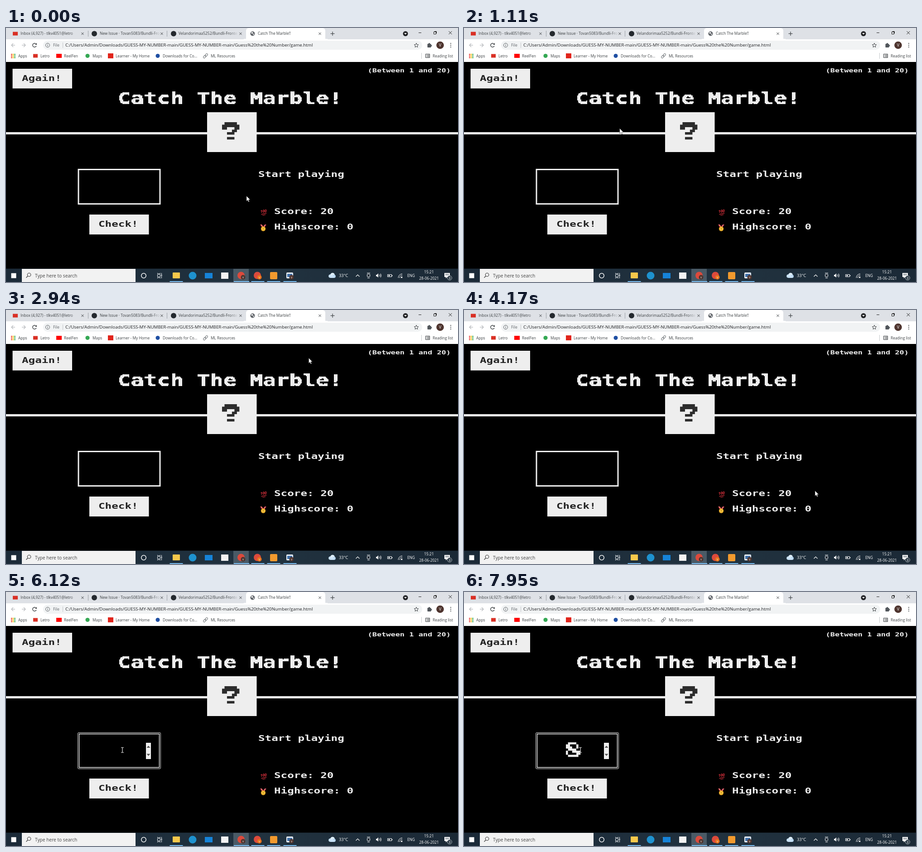
An HTML page with a canvas that plays this animation: 998 by 561 pixels, repeating every 7990 ms.

```html
<!DOCTYPE html>
<html lang="en">
<head>
<meta charset="utf-8">
<title>Catch The Marble!!</title>
<style>
  html, body { margin: 0; width: 100%; height: 100%; overflow: hidden; background: #000; }
  canvas { display: block; }
</style>
</head>
<body>
<canvas id="stage" width="998" height="561"></canvas>
<script>
const W = 998, H = 561, LOOP = 7990;
const INK = '#3c4043', PALE = '#eee', DARK = '#222', TABS = '#dee1e6';
const SANS = '"Open Sans", "Noto Sans", sans-serif';
const MONO = '"DejaVu Sans Mono", "Liberation Mono", monospace';
const WIDE = 1.384; // breadth of the blocky face

const stage = document.getElementById('stage').getContext('2d');
let c;

function makeLayer(w, h) {
  const layer = document.createElement('canvas');
  layer.width = w;
  layer.height = h;
  return layer;
}

function box(x, y, w, h, color, r = 0) {
  c.fillStyle = color;
  c.beginPath();
  c.roundRect(x, y, w, h, r);
  c.fill();
}

function disc(x, y, r, color) {
  c.fillStyle = color;
  c.beginPath();
  c.arc(x, y, r, 0, 7);
  c.fill();
}

function ring(x, y, r, color, width = 1, from = 0, to = Math.PI * 2) {
  c.strokeStyle = color;
  c.lineWidth = width;
  c.beginPath();
  c.arc(x, y, r, from, to);
  c.stroke();
}

function line(color, width, ...pts) {
  c.strokeStyle = color;
  c.lineWidth = width;
  c.beginPath();
  for (let i = 0; i < pts.length; i += 2) c.lineTo(pts[i], pts[i + 1]);
  c.stroke();
}

function poly(color, ...pts) {
  c.fillStyle = color;
  c.beginPath();
  for (let i = 0; i < pts.length; i += 2) c.lineTo(pts[i], pts[i + 1]);
  c.closePath();
  c.fill();
}

function frame(x, y, w, h, color, width = 1, r = 0) {
  c.strokeStyle = color;
  c.lineWidth = width;
  c.beginPath();
  c.roundRect(x, y, w, h, r);
  c.stroke();
}

function label(text, x, y, size = 8.4, color = INK, align = 'left') {
  c.font = `${size}px ${SANS}`;
  c.textAlign = align;
  c.fillStyle = color;
  c.fillText(text, x, y);
}

function wideText(ctx, text, x, y, size, color) {
  ctx.save();
  ctx.translate(x, y);
  ctx.scale(WIDE, 1);
  ctx.font = `bold ${size * 1.2}px ${MONO}`;
  ctx.textAlign = 'left';
  ctx.fillStyle = color;
  ctx.fillText(text, 0, 0);
  ctx.restore();
}

// Text set on a coarse grid, then enlarged with hard edges.
function blockText(text, x, y, size, color) {
  const layer = makeLayer(text.length * 16 + 16, 24);
  const ctx = layer.getContext('2d');
  wideText(ctx, text, 0, 18, 16, color);
  const img = ctx.getImageData(0, 0, layer.width, layer.height);
  for (let i = 3; i < img.data.length; i += 4) img.data[i] = img.data[i] > 75 ? 255 : 0;
  ctx.putImageData(img, 0, 0);
  const k = size / 16;
  c.imageSmoothingEnabled = false;
  c.drawImage(layer, x - k, y - 18 * k, layer.width * k, layer.height * k);
}

// Big signs built from bars: x, y, width, height in units.
const QUERY = [[1, 0, 5, 1], [0, 1, 7, 1], [0, 2, 2, 1], [5, 2, 2, 1], [4, 3, 2, 1], [2, 4, 3, 1], [2, 6, 3, 1]];
const EIGHT = [[1, 0, 4, 1], [0, 1, 2, 2], [2, 2, 1, 1], [5, 1, 1, 2], [1, 3, 4, 1],
  [0, 4, 1, 2], [3, 4, 4, 1], [5, 5, 2, 1], [1, 6, 5, 1]];

function sign(bars, x, y, unit, color) {
  c.fillStyle = color;
  c.beginPath();
  for (const [bx, by, w, h] of bars) c.rect(x + bx * unit, y + by * unit, w * unit, h * unit);
  c.fill();
}

function cross(x, y, s = 2.6, color = INK) {
  line(color, 1, x - s, y - s, x + s, y + s);
  line(color, 1, x + s, y - s, x - s, y + s);
}

function tab(title, x, right) {
  c.save();
  c.beginPath();
  c.rect(x, 0, right - x, 24);
  c.clip();
  label(title, x, 15.3);
  const fade = c.createLinearGradient(right - 18, 0, right, 0);
  fade.addColorStop(0, '#dee1e600');
  fade.addColorStop(1, TABS);
  box(right - 18, 0, 18, 24, fade);
  c.restore();
}

function drawTabs() {
  box(0, 0, W, 25, TABS);
  box(530, 0, 175, 30, '#fff', 6);
  box(525, 24, 185, 3, '#fff');
  box(15, 8.5, 11, 8, '#d93025');
  tab('Inbox (4,927) - tlkv4051@letro', 32, 160);
  disc(195, 12.5, 6, '#24292e');
  tab('New Issue · Tovan5083/Bundli-Frontend', 207, 341);
  disc(370, 12.5, 6, '#24292e');
  tab('Velandorimaa5252/Bundli-Frontend', 381, 512);
  disc(544.5, 12.5, 5, '#5f6368');
  poly('#fff', 541, 10, 544, 9, 546, 11, 543, 13);
  poly('#fff', 545, 14, 548, 12, 547, 16);
  label('Catch The Marble!!', 556, 15.3);
  for (const x of [169, 344, 518, 693]) cross(x, 12.5);
  for (const x of [181, 355]) box(x, 6, 1, 13, '#9aa0a6');
  line(INK, 1.2, 716.5, 12.5, 725.5, 12.5);
  line(INK, 1.2, 721, 8, 721, 17);
  disc(882, 12.5, 5.5, '#202124');
  poly('#fff', 879, 11, 885, 11, 882, 14.5);
  box(911, 10, 6, 1, '#222');
  frame(944.5, 8.5, 5, 5, '#222');
  line('#222', 1, 946, 7.5, 950.5, 7.5, 950.5, 12);
  cross(981, 10.5, 3.5, '#222');
}

function arrow(x, dir, color) {
  line(color, 1.2, x - 4, 38, x + 4, 38);
  line(color, 1.2, x, 34, x + 4 * dir, 38, x, 42);
}

function star(x, y, r) {
  const pts = [];
  for (let i = 0; i <= 10; i++) {
    const a = i * Math.PI / 5 - Math.PI / 2, q = i % 2 ? r * 0.45 : r;
    pts.push(x + q * Math.cos(a), y + q * Math.sin(a));
  }
  line(INK, 1, ...pts);
}

function drawToolbar() {
  box(0, 25, W, 50, '#fff');
  box(82, 28, 837, 20, '#f1f3f4', 10);
  arrow(16, -1, '#b4b7ba');
  arrow(39, 1, '#b4b7ba');
  ring(63, 38, 4.2, INK, 1.4, 0.4, 5.4);
  poly(INK, 64, 37, 68, 37, 68, 33);
  ring(92, 38, 4.5, '#5f6368');
  box(91.5, 37.3, 1, 3.2, '#5f6368');
  box(91.5, 35.2, 1, 1.2, '#5f6368');
  label('File', 104, 41.4, 8.8, '#5f6368');
  box(125, 32, 1, 12, '#c4c7ca');
  label('C:/Users/Admin/Downloads/GUESS-MY-NUMBER-main/GUESS-MY-NUMBER-main/Guess%20the%20Number/game.html',
    131, 41.4, 9.8, '#202124');
  star(906, 38.4, 5);
  box(930.5, 35, 8, 8, '#50555a', 1);
  disc(934.5, 34.8, 1.7, '#50555a');
  disc(938.8, 39, 1.7, '#50555a');
  disc(958.5, 38, 8.3, '#4e342e');
  label('V', 958.5, 41.2, 8.6, '#fff', 'center');
  for (const y of [34, 38, 42]) disc(982, y, 1.1, INK);

  const dots = ['#ea4335', '#fbbc04', '#34a853', '#4285f4'];
  for (let i = 0; i < 9; i++) {
    const row = Math.floor(i / 3);
    box(11 + i % 3 * 3.6, 57 + row * 3.6, 2.5, 2.5, dots[(i + row) % 4]);
  }
  box(60, 57.5, 10, 8, '#d93025');
  box(111, 57, 12, 9, '#f00');
  disc(180, 61.5, 4.6, '#34a853');
  box(225, 56, 12, 11, '#e1251b');
  disc(335, 61.5, 4.5, '#1f4fa3');
  c.save();
  c.translate(440.5, 61.5);
  c.rotate(-0.8);
  frame(-6, -2, 6.5, 4, '#6d7276', 1.1, 2);
  frame(-0.5, -2, 6.5, 4, '#6d7276', 1.1, 2);
  c.restore();
  const marks = [['Apps', 27], ['Letro', 76], ['ReelFen', 128], ['Maps', 191],
    ['Learner - My Home', 242], ['Downloads for Co...', 346], ['ML Resources', 452], ['Reading list', 942]];
  for (const [text, x] of marks) label(text, x, 64.6);
  box(917, 55, 1, 13, '#c4c7ca');
  frame(926.5, 57.5, 9, 8, INK);
  for (const y of [59.5, 61.5, 63.5]) {
    box(928, y - 0.4, 1, 1, INK);
    box(930, y - 0.4, 4.5, 1, INK);
  }
}

function drawHundred() {
  c.save();
  c.translate(568.5, 404);
  c.rotate(-0.13);
  c.font = `italic bold 8.5px ${SANS}`;
  c.textAlign = 'center';
  c.fillStyle = '#d32f3a';
  c.fillText('100', 0, 3.5);
  line('#d32f3a', 1.3, -6, 7, 6, 5.8);
  line('#d32f3a', 1.1, -3.5, 9.6, 3.5, 8.8);
  c.restore();
}

function drawMedal() {
  poly('#d93a3a', 561, 434, 565, 434, 570, 441, 566, 442);
  poly('#c22e3b', 575, 434, 571, 434, 566, 441, 570, 442);
  line('#e9e4ee', 0.8, 563, 434, 568, 441, 573, 434);
  disc(568, 443.5, 5.2, '#e0a021');
  disc(568, 443.5, 3.6, '#f6c945');
  disc(568, 443.5, 1.4, '#d18e18');
}

function drawPage() {
  box(0, 75, W, 457, '#000');
  box(0, 230, W, 5, PALE);
  box(14.5, 90, 131.5, 43.5, PALE);
  box(184, 412, 131.5, 44, PALE);
  box(444, 186, 109.5, 88, PALE);
  wideText(c, 'Again!', 35, 117, 14.6, DARK);
  wideText(c, 'Check!', 204, 439, 14.6, DARK);
  wideText(c, '(Between 1 and 20)', 798.5, 98, 10.2, PALE);
  wideText(c, 'Start playing', 557, 329, 14.6, PALE);
  wideText(c, 'Score: 20', 592, 411, 14.6, PALE);
  wideText(c, 'Highscore: 0', 592, 445, 14.6, PALE);
  blockText('Catch The Marble!', 248, 167.5, 29.2, PALE);
  sign(QUERY, 477, 208, 5.475, '#2c2c2c');
  drawHundred();
  drawMedal();
}

function badge(x, color) {
  disc(x, 550.5, 5, color);
  label('V', x, 552.8, 6, '#fff', 'center');
}

function drawTaskbar() {
  const bar = c.createLinearGradient(0, 0, W, 0);
  bar.addColorStop(0, '#1b2a38');
  bar.addColorStop(0.6, '#21323f');
  bar.addColorStop(1, '#1b2936');
  box(0, 531.5, W, 30, bar);
  box(35, 532, 251, 29, '#f2f2f2');
  box(502, 532, 34, 29, '#4a5a66');
  box(11.5, 541.5, 11, 11, '#fff');
  ring(51, 545, 3.8, '#333', 1.1);
  line('#333', 1.2, 48, 548, 44.5, 551.5);
  label('Type here to search', 64, 550.5, 10.2, '#444');
  ring(304, 547, 5.2, '#fff', 1.5);
  frame(334.5, 544.5, 6, 5, '#e8ecef');
  line('#e8ecef', 1, 334.5, 541, 334.5, 542.5, 340.5, 542.5, 340.5, 541);
  line('#e8ecef', 1, 334.5, 553, 334.5, 551.5, 340.5, 551.5, 340.5, 553);
  line('#e8ecef', 1, 343.5, 541, 343.5, 553);
  box(342.5, 545, 2, 2.5, '#e8ecef');

  box(368, 540, 16, 13, '#f7c84b', 1);
  disc(412, 547, 8.5, '#1e92cf');
  box(439, 541, 17, 12, '#1683d8');
  box(475, 540, 16, 14, '#f3f3f3');
  disc(519, 546.5, 8, '#dc4a3c');
  badge(523.5, '#4e342e');
  disc(555, 546.5, 8, '#dc4a3c');
  badge(559.5, '#e8711a');
  box(583, 539, 16, 16, '#f29a2e', 2);
  box(619, 540, 15, 13, '#e8eef5', 2);
  box(621, 543, 11, 7, '#3f6fa8');
  badge(630.5, '#4e342e');
  for (const x of [376, 520, 556, 591, 627]) {
    const w = x === 520 ? 34 : 29;
    box(x - w / 2, 559, w, 2, '#76b9ed');
  }

  disc(716, 548, 3.8, '#c9e2f7');
  disc(721, 545.5, 4.8, '#dcedfb');
  disc(724.5, 548.5, 3.4, '#b9d7f2');
  box(716, 547, 8.5, 5, '#c9e2f7');
  label('33°C', 735, 550.3, 9.3, '#fff');
  line('#fff', 1.1, 772.5, 549, 776.5, 545, 780.5, 549);
  frame(797.5, 543.5, 6, 6, '#fff', 1, 1);
  line('#fff', 1, 797, 541.2, 804, 541.2);
  line('#fff', 1, 798, 552.2, 803, 552.2);
  poly('#fff', 817, 545, 819, 545, 822, 542, 822, 551, 819, 548.5, 817, 548.5);
  for (const r of [2, 4, 6]) ring(822.5, 546.7, r, '#fff', 0.9, -0.8, 0.8);
  frame(842.5, 544.5, 9, 5, '#fff');
  box(852, 546, 1.3, 2, '#fff');
  box(844, 546, 4, 2, '#fff');
  for (const r of [3, 6, 9]) ring(875, 552, r, '#fff', 1, Math.PI, Math.PI * 1.5);
  disc(874, 551, 1.3, '#fff');
  label('ENG', 886, 550, 8.3, '#fff');
  label('15:21', 934, 542.3, 8.4, '#fff', 'center');
  label('28-06-2021', 934, 555.5, 8.4, '#fff', 'center');
  box(968, 541, 12, 9, '#fff');
  poly('#fff', 971, 549, 975, 549, 971, 553);
  for (const y of [543, 545.3]) box(970, y, 8, 0.8, '#33414d');
  disc(979.5, 552, 5, '#2c3a46');
  ring(979.5, 552, 5, '#dfe4e8', 0.7);
  label('3', 979.5, 554.9, 7.5, '#fff', 'center');
}

function drawInput(focused, hovered, filled) {
  if (focused) {
    frame(158.5, 310.5, 183, 80, '#ddd', 1, 2.5);
    frame(161.5, 313.5, 177, 74, '#fff', 1.4);
  } else {
    frame(160, 312.5, 180, 76, PALE, 3);
  }
  if (filled) sign(EIGHT, 225, 332, 4.6, PALE);
  if (focused || hovered) {
    box(309, 333, 11, 36, '#efefef');
    poly('#505050', 310.5, 344, 318.5, 344, 314.5, 339.5);
    poly('#505050', 310.5, 357.5, 318.5, 357.5, 314.5, 362);
  }
}

// time, x, y of the pointer tip
const PATH = [
  [0, 531, 371], [400, 500, 346], [1110, 344, 222], [1790, 160, 141],
  [2100, 170, 138], [2940, 668, 106], [3500, 745, 215], [4170, 775, 399],
  [4450, 765, 412], [5300, 257, 349], [LOOP, 257, 349]
];

function slope(i, k) {
  if (i === 0 || i >= PATH.length - 2) return 0;
  return (PATH[i + 1][k] - PATH[i - 1][k]) / (PATH[i + 1][0] - PATH[i - 1][0]);
}

function pointerAt(t) {
  let i = 0;
  while (i < PATH.length - 2 && t >= PATH[i + 1][0]) i++;
  const a = PATH[i], b = PATH[i + 1], d = b[0] - a[0], u = (t - a[0]) / d;
  return [1, 2].map(k =>
    a[k] + (b[k] - a[k]) * u * u * (3 - 2 * u) +
    d * u * (1 - u) * (slope(i, k) * (1 - u) - slope(i + 1, k) * u));
}

function drawArrow(x, y) {
  c.save();
  c.translate(x, y);
  const pts = [0, 0, 0, 11.5, 2.6, 9.2, 4.5, 13.2, 6.3, 12.4, 4.5, 8.5, 8, 8.2];
  poly('#fff', ...pts);
  line('#222', 0.6, ...pts, 0, 0);
  c.restore();
}

function drawBeam(x, y) {
  const color = '#b4b4b4';
  line(color, 1.6, x, y - 5.5, x, y + 5.5);
  for (const s of [-5.5, 5.5]) line(color, 1.4, x - 3, y + s, x + 3, y + s);
}

const scene = makeLayer(W, H);
c = scene.getContext('2d');
drawTabs();
drawToolbar();
drawPage();
drawTaskbar();

function draw(t) {
  c = stage;
  c.drawImage(scene, 0, 0);
  const [x, y] = pointerAt(t);
  const inside = x > 159 && x < 341 && y > 311 && y < 390;
  drawInput(t >= 5600, inside, t >= 7100);
  if (inside) drawBeam(x, y);
  else drawArrow(x, y);
}

function tick() {
  draw(performance.now() % LOOP);
  requestAnimationFrame(tick);
}
tick();
</script>
</body>
</html>
```
